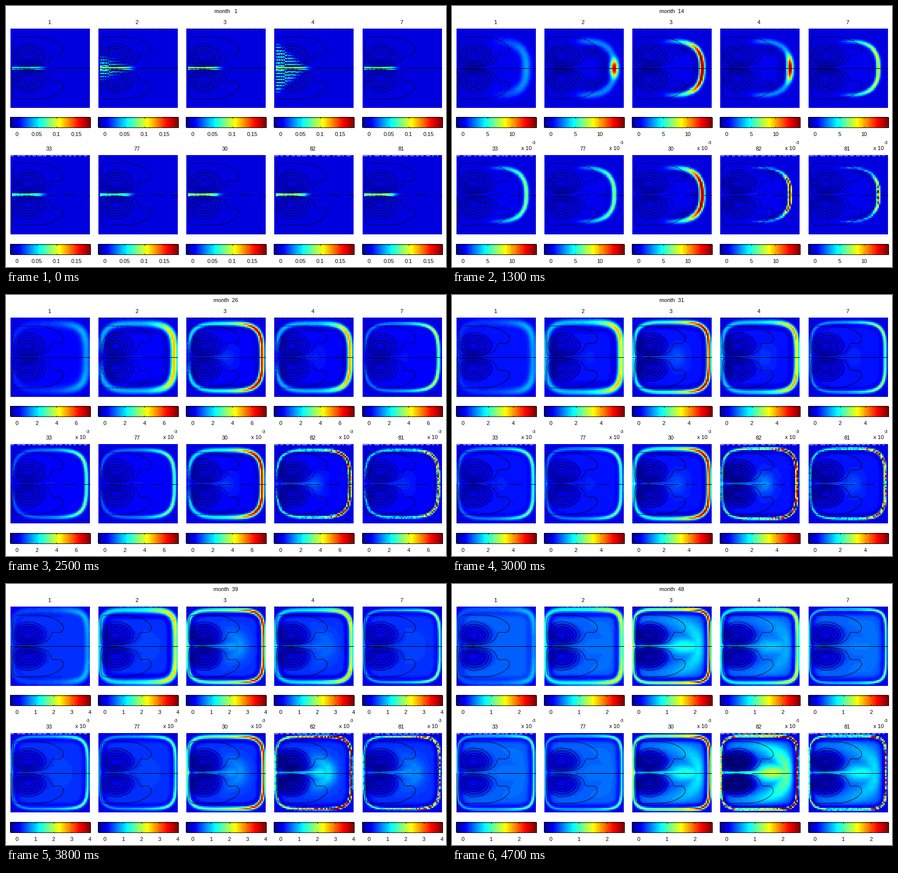
A matplotlib script for the animation above (4800 ms loop, 876x520 px).

```python
import numpy as np
import matplotlib.pyplot as plt
from matplotlib.animation import FuncAnimation
from matplotlib.colors import ListedColormap

W, H, DPI, FRAMES = 876, 520, 100, 48
PX = 72 / DPI
SIZE, N = 158, 52
CELL = SIZE / N
LOW = -0.0927            # colour floor as a share of the ceiling
MAX_TICKS = 8
BAR_W, BAR_H = 160, 21

# advection schemes: front width, reach, early peak, late peak, return flow
SCHEMES = {
    "1": (2.4, 1, .22, .18, 0),
    "2": (1.9, .25, 1.3, .42, .02),
    "3": (1.25, .8, 1.4, .68, .22),
    "4": (1.5, .35, 1.4, .42, .12),
    "7": (1, 1, .8, .36, .03),
    "33": (1.1, 1, .62, .32, .02),
    "82": (.75, .5, 1.7, 1.05, .42),
    "81": (.75, .45, 1.3, .65, .2),
}
SCHEMES["77"], SCHEMES["30"] = SCHEMES["33"], SCHEMES["3"]
NAMES = ["1", "2", "3", "4", "7", "33", "77", "30", "82", "81"]

axis = (np.arange(N) + .5) * CELL
X, Y = np.meshgrid(axis, axis - SIZE / 2)
AY = abs(Y)
rng = np.random.default_rng(4)
half = rng.uniform(-1, 1, (N // 2, N))
NOISE = np.vstack([half, half[::-1]])


def bell(x):
    return np.exp(-x ** 2)


def rise(x):
    return 1 / (1 + np.exp(-np.clip(x, -40, 40)))


def ring(cx, a, b, p):
    """Signed distance to a superellipse and the angle from its nose."""
    f = (abs((X - cx) / a) ** p + (AY / b) ** p) ** (1 / p)
    gy, gx = np.gradient(f, CELL)
    return (f - 1) / np.maximum(np.hypot(gx, gy), 1e-3), np.arctan2(AY / b, (X - cx) / a)


CORE = bell(((X - 34) / 38) ** 2 + ((AY - 23) / 22) ** 2)


def ceiling(m):
    return .185 * m ** -(.94 + .16 * (m / FRAMES) ** 2)


def front(m, u, scheme):
    """Arc that runs from the jet to the walls; also returns its distance map."""
    width, reach, early, late, _ = scheme
    nose = 154 - 88 * np.exp(-.135 * (m - 1))
    cx = 78 - 38 * np.exp(-(m - 1) / 2)
    d, s = ring(cx, nose - cx, 74 * (1 - np.exp(-m / 11)), 2 + 4 * u ** 1.4)

    sigma = width * (3.2 - 1.3 * u)
    peak = late + (early - late) * np.exp(-max(m - 7, 0) / 14)
    tail = .65 * u * min(peak, 1)
    spread = (reach + (1 - reach) * np.clip((m - 14) / 22, 0, 1)) * (1.15 + .3 * u)
    cut = rise((1 + 5 * u ** 1.5 - s) / .12)
    along = tail + (peak - tail) * np.exp(-(s / spread) ** 2.5)
    along *= 1 + .4 * rise((m - 17) / 2) * bell((s - .8) / .35)
    along *= 1 + 2.5 * max(.9 - width, 0) * NOISE * np.clip((m - 7) / 7, 0, 1)
    z = along * cut * bell(d / sigma / 1.41) * min((m - 1) / 2, 1)
    if early > 1 and m > 3:
        z -= .05 * cut * bell((d / sigma + 3.2) / 1.6)
    return z, d, nose


def jet(m, nose, name):
    fade = .45 ** (m - 1)
    strength = .4 + .25 * min(SCHEMES[name][2], 1.2)
    z = strength * bell(Y / 2.2) * rise((nose - 2 - X) / 5)
    if name in ("2", "4"):
        reach = 24 if name == "2" else 52
        stripes = (np.floor(AY / CELL + X / 40) % 2) * (AY > 3)
        z += .32 * stripes * rise((reach * (1 - X / 62) - AY) / 4)
    return fade * z * (X > 3)


def returning(u, d, flow):
    """Weak tracer that fills the interior and comes back along the axis."""
    late = u ** 2
    inside = rise(-(d + 9) / 3)
    tip = 62 + 70 * late
    d2, s2 = ring(50, tip - 50, 10 + 46 * u ** 4, 2.3)
    arc = .7 * bell(d2 / 16) * bell(s2 / 1.25)
    tongue = bell(Y / 16) * rise((X - 80) / 7) * rise((tip - X) / 8)
    z = inside * (.14 * (1 - .8 * CORE) + flow * np.maximum(arc, tongue))
    z += .8 * flow * bell(Y / 2.5) * rise((80 - X) / 6) - .3 * flow * CORE
    return late * z


def field(name, m):
    u = (m - 1) / (FRAMES - 1)
    z, d, nose = front(m, u, SCHEMES[name])
    return z + jet(m, nose, name) + returning(u, d, SCHEMES[name][-1])


def smooth_loop(points, n=8):
    """Closed Catmull-Rom curve."""
    p = np.array(points, float)
    t = np.linspace(0, 1, n, endpoint=False)[None, :, None]
    a, b, c, d = (np.roll(p, k, 0)[:, None, :] for k in (1, 0, -1, -2))
    out = .5 * (2 * b + (c - a) * t + (2 * a - 5 * b + 4 * c - d) * t ** 2
                + (3 * b - a - 3 * c + d) * t ** 3)
    out = out.reshape(-1, 2)
    return np.vstack([out, out[:1]])


def stream_lines():
    """Two mirrored gyres, as offsets from the left end of the axis."""
    loops = [smooth_loop([(5, 10), (5, 50), (8, 58), (14, 61.5), (40, 61.5), (66, 60.5),
                          (88, 54), (103, 43), (105, 33), (98, 27), (84, 27),
                          (79, 18), (74, 11), (60, 5), (40, 3), (12, 3)])]
    t = np.linspace(0, 2 * np.pi, 60)
    c, s = np.cos(t), np.sin(t)
    for k in range(1, 6):
        rx = np.where(c > 0, 4 + 6.4 * k, 4.5 + 4.5 * k)
        ry = np.where(s > 0, 1 + 5.2 * k, 4 + 3 * k)
        loops.append(np.c_[34 + rx * c, 21.5 + ry * s])
    gap = [[np.nan, np.nan]]
    return np.vstack([np.vstack([q * [1, sign], gap]) for q in loops for sign in (-1, 1)])


def jet_map():
    t = np.arange(1, 65) / 64
    rgb = [np.minimum(4 * t - 1.5, 4.5 - 4 * t), np.minimum(4 * t - .5, 3.5 - 4 * t),
           np.minimum(4 * t + .5, 2.5 - 4 * t)]
    return ListedColormap(np.clip(np.array(rgb).T, 0, 1))


def tick_step(span):
    for power in range(-1, -5, -1):
        for k in (5, 2, 1):
            if span / (k * 10.0 ** power) >= 2.7:
                return k * 10.0 ** power
    return 1e-4


plt.rcParams["font.family"] = "Liberation Sans"
fig = plt.figure(figsize=(W / DPI, H / DPI), dpi=DPI, facecolor="white")
ax = fig.add_axes([0, 0, 1, 1])
ax.axis("off")
CMAP = jet_map()


def label(x, y, text="", size=11, ha="center"):
    return ax.text(x, y, text, fontsize=size * PX, ha=ha, va="baseline", color="black")


def stroke(x, y, color="black", width=1, style="-"):
    return ax.plot(x, y, color=color, lw=width * PX, ls=style,
                   solid_capstyle="butt", dash_capstyle="butt")[0]


def picture(data, x, y, w, h, lo, hi):
    return ax.imshow(data, extent=(x, x + w, y + h, y), cmap=CMAP, vmin=lo, vmax=hi,
                     interpolation="nearest", aspect="auto", origin="upper")


def broken(x, y, color):
    pos = x
    while pos < x + SIZE - 10:
        end = pos + rng.uniform(3, 10)
        stroke([pos, end], [y, y], color)
        pos = end + rng.uniform(2, 7)


def place(i):
    """Corner of a panel and of its colour bar."""
    row, col = divmod(i, 5)
    x = int(9 + 175.25 * col)
    return row, col, x, 45 + 252 * row, x - 1, 221 + 253 * row


LINES = stream_lines()
panels, contours, axis_ends, tick_text, powers = [], [], [], [], []
for i, name in enumerate(NAMES):
    row, col, x, y, bx, by = place(i)
    mid = y + SIZE / 2 - .5
    panels.append(picture(np.zeros((N, N)), x, y, SIZE, SIZE, LOW, 1))
    contours.append(stroke(x + LINES[:, 0], mid + LINES[:, 1], width=.9))
    stroke([x + 62 * row, x + 84], [mid + row] * 2)
    axis_ends.append(stroke([x + 84, x + SIZE], [mid + row] * 2))
    if row == 0 and col in (1, 2, 3):
        broken(x, y - .5, "black")
    if row == 1 and col in (0, 3, 4):
        broken(x, y + .5, "white")
    if col == 0:
        stroke([8.5, 8.5], [mid, y + SIZE - 2])
    label(x + 77, y - 9, name)

    picture(np.arange(64)[None], bx, by, BAR_W, BAR_H, 0, 63)
    x0, x1, y0, y1 = bx + .5, bx + BAR_W - .5, by + .5, by + BAR_H - .5
    stroke([x0, x1, x1, x0, x0], [y0, y0, y1, y1, y0])
    tick_text.append([label(0, by + 38) for _ in range(MAX_TICKS)])
    if row == 0:
        powers += [label(x + 129, 287, "x 10", ha="left"),
                   label(x + 150, 275, "-3", 9, "left")]

month_text = label(437.5, 14)
tick_marks = stroke([], [])
ax.set_xlim(0, W)
ax.set_ylim(H, 0)


def draw(frame):
    m = frame + 1
    month_text.set_text(f"month {m:3d}")
    for name, image in zip(NAMES, panels):
        image.set_data(field(name, m))
    for line in contours:
        line.set_linestyle((0, (8, 1.5)) if m < 30 else "-")
    for line in axis_ends[5:]:
        line.set_linestyle((17, (24, 14)) if m < 35 else "-")

    top = ceiling(m)
    step = tick_step(top * (1 - LOW))
    small = step < .0099
    ticks = np.arange(0, top, step)
    xs, ys = [], []
    for i, texts in enumerate(tick_text):
        bx, by = place(i)[-2:]
        for text in texts:
            text.set_visible(False)
        for v, text in zip(ticks, texts):
            px = bx + .5 + (BAR_W - 1) * (v / top - LOW) / (1 - LOW)
            text.set_text(f"{v * 1000 if small else v:.3g}")
            text.set_x(px)
            text.set_visible(True)
            xs += [px, px, np.nan] * 2
            ys += [by, by + 2.5, np.nan, by + BAR_H - 2.5, by + BAR_H, np.nan]
    tick_marks.set_data(xs, ys)
    for text in powers:
        text.set_visible(small)
    return []


anim = FuncAnimation(fig, draw, frames=FRAMES, interval=100, repeat=True,
                     repeat_delay=0, blit=False)
plt.show()
```
